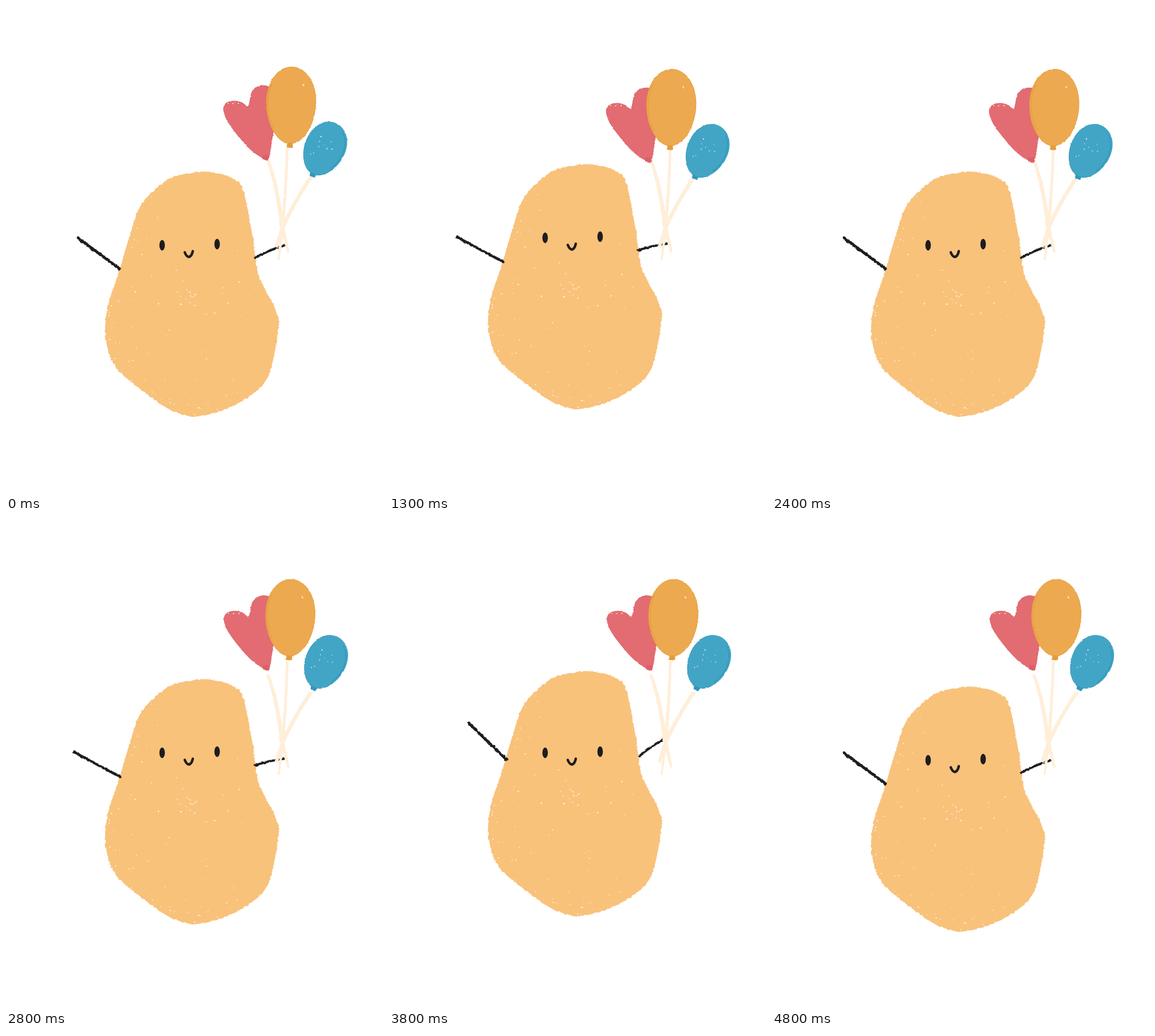
An HTML page for the animation above (5.01 s loop, 658 px wide and 851 px high).

```html
<!DOCTYPE html>
<html lang="en">
<head>
<meta charset="utf-8">
<title>Potato with balloons</title>
<style>
  html, body { margin: 0; width: 100%; height: 100%; overflow: hidden; background: #fff; }
  svg { display: block; width: 658px; height: 851px; }
  path { stroke-linecap: round; stroke-linejoin: round; }
  .ink { fill: none; stroke: #1d1d1f; }
  .specks { fill: #fff; }
  .shade { fill: none; stroke-width: 1.6; }
</style>
</head>
<body>
<svg viewBox="0 0 658 851">
  <defs>
    <!-- The colour matrix makes the noise opaque, so that it displaces evenly in all directions. -->
    <filter id="rough" filterUnits="userSpaceOnUse" x="0" y="0" width="658" height="851" color-interpolation-filters="sRGB">
      <feTurbulence type="fractalNoise" baseFrequency=".2" numOctaves="2" seed="4"/>
      <feColorMatrix values="1 0 0 0 0  0 1 0 0 0  0 0 1 0 0  0 0 0 0 1" result="noise"/>
      <feDisplacementMap in="SourceGraphic" in2="noise" scale="4" xChannelSelector="R" yChannelSelector="G"/>
    </filter>
    <filter id="soft" filterUnits="userSpaceOnUse" x="0" y="0" width="658" height="851" color-interpolation-filters="sRGB">
      <feTurbulence type="fractalNoise" baseFrequency=".2" numOctaves="2" seed="7"/>
      <feColorMatrix values="1 0 0 0 0  0 1 0 0 0  0 0 1 0 0  0 0 0 0 1" result="noise"/>
      <feDisplacementMap in="SourceGraphic" in2="noise" scale="2.500" xChannelSelector="R" yChannelSelector="G"/>
    </filter>
  </defs>

  <g id="body" filter="url(#rough)">
    <path id="skin" fill="#f8c27b"/>
    <path id="skinSpecks" class="specks"/>
  </g>
  <g id="face" fill="#1d1d1f">
    <ellipse cx="272.500" cy="418" rx="4.800" ry="9.200"/>
    <ellipse cx="368.500" cy="416" rx="4.800" ry="9.200"/>
    <path class="ink" stroke-width="4.400" d="M312 430.500Q315 438 319 438.500Q324 438 326 428.500"/>
  </g>

  <g class="ink" filter="url(#rough)">
    <path id="leftArm" stroke-width="4.800"/>
    <path id="rightArm" stroke-width="4.200"/>
  </g>

  <g fill="#ffeed8" filter="url(#soft)">
    <path d="M454 269Q470 312 478.500 388L491 431L495 430L485.500 385Q477 312 459 267Z"/>
    <path d="M488.500 245Q487 312 480 388L474 444H477.500L485.500 388Q491.500 312 493.500 245Z"/>
    <path d="M529.500 298Q496 347 479 388L469 420L474 423L486 388Q503 349 535.500 300Z"/>
  </g>

  <g filter="url(#soft)">
    <g id="heart">
      <path id="heartShape" fill="#e26c71" stroke="#dd5f68"/>
      <path fill="#dd5f68" d="M448 261L457 260L459 267L454 270L447 267Z"/>
      <path id="heartSpecks" class="specks"/>
    </g>
    <g id="orange">
      <path id="orangeShape" fill="#eca950" stroke="#e49c3a"/>
      <path id="orangeShade" class="shade" stroke="#e49f41"/>
      <path fill="#e49c3a" d="M491 240L500 239L501 247L496 248L490 247Z"/>
      <path id="orangeSpecks" class="specks"/>
    </g>
    <g id="blue">
      <path id="blueShape" fill="#43a5c6" stroke="#3198ba"/>
      <path id="blueShade" class="shade" stroke="#3198ba"/>
      <path fill="#3198ba" d="M531 290L541 295L539 300L530 297Z"/>
      <path id="blueSpecks" class="specks"/>
    </g>
  </g>
</svg>

<script>
const el = id => document.getElementById(id);
const draw = (id, d) => el(id).setAttribute('d', d);
const shift = (id, x, y) => el(id).setAttribute('transform', `translate(${x} ${y})`);

// Closed Catmull-Rom curve through "x,y x,y ..."
function closedCurve(text) {
  const points = text.split(' ').map(pair => pair.split(',').map(Number));
  const at = i => points[(i + points.length) % points.length];
  const handle = (p, a, b) => p.map((v, k) => (v + (b[k] - a[k]) / 6).toFixed(1));
  return 'M' + at(0) + points.map((p, i) => {
    const next = at(i + 1);
    return `C${handle(p, at(i - 1), next)} ${handle(next, at(i + 2), p)} ${next}`;
  }).join('') + 'Z';
}

// Arc of a tilted egg that narrows downwards; angles in degrees
function eggArc({ cx, cy, rx, ry, tilt }, from = 0, to = 360, scale = 1) {
  const points = [];
  const cos = Math.cos(tilt * Math.PI / 180), sin = Math.sin(tilt * Math.PI / 180);
  for (let angle = from; angle <= to; angle += 6) {
    const a = angle * Math.PI / 180;
    const x = scale * rx * Math.cos(a) * (1 - 0.08 * Math.sin(a));
    const y = scale * ry * Math.sin(a);
    points.push(`${(cx + x * cos - y * sin).toFixed(1)} ${(cy + x * sin + y * cos).toFixed(1)}`);
  }
  return 'M' + points.join('L');
}

let seed = 11;
const random = () => (seed = seed * 16807 % 2147483647) / 2147483647;
const spread = () => random() + random() - 1;

function speck(x, y) {
  const w = 0.8 + random() * 1.2, h = 0.8 + random() * 1.2;
  return `M${x.toFixed(1)} ${y.toFixed(1)}h${w.toFixed(1)}v${h.toFixed(1)}h${(-w).toFixed(1)}z`;
}
const repeat = (count, make) => Array.from({ length: count }, make).join('');
const scatter = (cx, cy, rx, ry, count) =>
  repeat(count, () => speck(cx + spread() * rx, cy + spread() * ry));

// Specks that thin out from a stretch of an outline towards a centre
function edgeSpecks(path, cx, cy, from, to, count) {
  const length = path.getTotalLength();
  return repeat(count, () => {
    const p = path.getPointAtLength(length * (from + (to - from) * random()));
    const inward = 0.02 + 0.3 * random() ** 2;
    return speck(p.x + (cx - p.x) * inward, p.y + (cy - p.y) * inward);
  });
}

draw('skin', closedCurve('335,290 283,303 237,346 217,398 200,455 179,520 173,568 181,611 200,641 ' +
  '246,678 288,706 335,717 400,697 455,652 475,565 470,530 441,470 431,405 414,322 398,303 370,292'));
draw('skinSpecks', edgeSpecks(el('skin'), 325, 510, 0.08, 0.58, 55) +
  scatter(318, 508, 20, 18, 16) + scatter(330, 530, 130, 150, 24));

draw('heartShape', closedCurve('423,175 430,149 445,139.500 462,145 474,180 465,228 459,264 ' +
  '453,268 425,249 391,208 380,183 384,170 398,166 412,169'));
draw('heartSpecks', scatter(395, 169, 12, 2, 4));

const orangeEgg = { cx: 497.5, cy: 173.5, rx: 43, ry: 67, tilt: 1.5 };
draw('orangeShape', eggArc(orangeEgg) + 'Z');
draw('orangeShade', eggArc(orangeEgg, 140, 220, 0.94));
draw('orangeSpecks', scatter(518, 138, 2, 3, 3));

const blueEgg = { cx: 556, cy: 249.5, rx: 35, ry: 48.5, tilt: 25 };
draw('blueShape', eggArc(blueEgg) + 'Z');
draw('blueShade', eggArc(blueEgg, -60, 40, 0.92));
draw('blueSpecks', scatter(552, 242, 28, 34, 9));

// Each arm runs from shoulder to hand.
const bodyPoses = [
  { y: 0, left: [198, 459, 125, 405], right: [435, 440, 487, 418] },
  { y: 13, left: [198, 468, 132, 405], right: [434, 453, 481, 417] },
  { y: -13, left: [199, 447, 119, 404], right: [435, 427, 488, 415] },
  { y: -27, left: [205, 417, 139, 353], right: [437, 411, 484, 379] }
];
const FACE_TOP = -13;

// Balloons bob: rest, down, rest, up.
const bobs = {
  heart: { down: [-0.5, 4], up: [1, -8.5] },
  orange: { down: [-5, 4], up: [-1.5, -4.5] },
  blue: { down: [-1, 4], up: [1.5, -3] }
};
const bobOrder = ['rest', 'down', 'rest', 'up'];

function armPath([x1, y1, x2, y2], bow) {
  return `M${x1} ${y1}Q${(x1 + x2) / 2 - bow} ${(y1 + y2) / 2 - bow} ${x2} ${y2}`;
}

const LOOP = 5010, LAST = 4999, TICK = 100, BODY_STEP = 200, BALLOON_STEP = 250;
let shownTime = -1;

function render() {
  const now = Math.min(performance.now() % LOOP, LAST);
  const time = Math.floor(now / TICK) * TICK;
  if (time !== shownTime) {
    shownTime = time;
    const pose = bodyPoses[Math.floor(time / BODY_STEP) % 4];
    shift('body', 0, pose.y);
    shift('face', 0, Math.max(pose.y, FACE_TOP));
    draw('leftArm', armPath(pose.left, 0));
    draw('rightArm', armPath(pose.right, 2.5));
    const bob = bobOrder[Math.floor(time / BALLOON_STEP) % 4];
    for (const id in bobs) shift(id, ...(bobs[id][bob] || [0, 0]));
  }
  requestAnimationFrame(render);
}
render();
</script>
</body>
</html>
```
